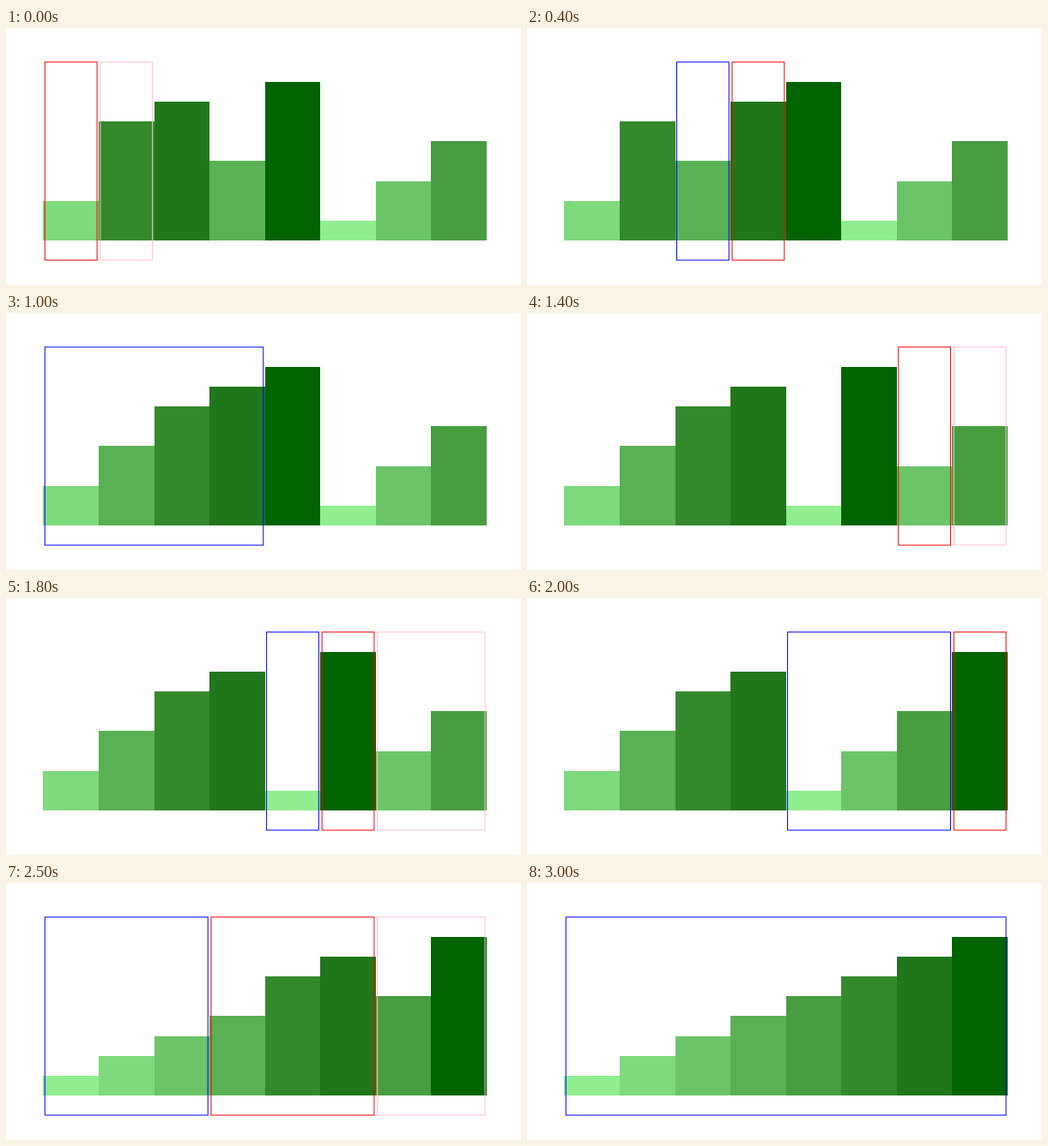
These frames come from a looping animation (600 px wide and 300 px high, 4.1 s). An HTML page with a canvas:

```html
<!DOCTYPE html>
<html lang="en">
<head>
<meta charset="utf-8">
<title>Merge sort</title>
<style>
  html, body { margin: 0; overflow: hidden; background: #fff; }
  canvas { display: block; }
</style>
</head>
<body>
<canvas id="stage" width="600" height="300"></canvas>
<script>
const ctx = document.getElementById("stage").getContext("2d");
const STEP = 100, LOOP = 4100;
const LEFT = 43.4, SLOT = 64.57, BASE = 247.9, UNIT = 23.12, INSET = 1.9;
const greens = ["#90ee90", "#7fd97d", "#6cc469", "#5ab055",
                "#489d41", "#34892c", "#20761a", "#006400"];

const values = [2, 6, 7, 4, 8, 1, 3, 5];
const steps = [];

// Each step holds the bars and the bounds of the merged, left and right runs.
function record(lo, i, mid, hi) {
  steps.push({ bars: values.slice(), bounds: [lo, i, mid, hi] });
}

function sort(lo, hi) {
  if (hi - lo < 2) return;
  let mid = (lo + hi) / 2;
  sort(lo, mid);
  sort(mid, hi);
  record(lo, lo, mid, hi);
  for (let i = lo; i < hi;) {
    if (i === mid || (mid < hi && values[mid] < values[i])) {
      values.splice(i, 0, values.splice(mid, 1)[0]);
      mid++;
    }
    record(lo, ++i, mid, hi);
  }
}

const slotX = k => LEFT + k * SLOT;
const levelY = v => BASE - v * UNIT;

function drawBar(value, k) {
  const x = Math.round(slotX(k)), y = Math.round(levelY(value));
  ctx.fillStyle = greens[value - 1];
  ctx.fillRect(x, y, Math.round(slotX(k + 1)) - x, Math.round(BASE) - y);
}

function drawBox(from, to, color) {
  if (from === to) return;
  ctx.strokeStyle = color;
  ctx.strokeRect(slotX(from) + INSET, levelY(9),
                 (to - from) * SLOT - 2 * INSET, 10 * UNIT);
}

function draw(now) {
  const index = Math.floor(now % LOOP / STEP);
  const { bars, bounds } = steps[Math.min(index, steps.length - 1)];
  ctx.fillStyle = "#fff";
  ctx.fillRect(0, 0, 600, 300);
  bars.forEach(drawBar);
  ["blue", "red", "pink"].forEach((color, n) => drawBox(bounds[n], bounds[n + 1], color));
}

function tick() {
  draw(performance.now() - start);
  requestAnimationFrame(tick);
}

sort(0, values.length);
const start = performance.now();
tick();
</script>
</body>
</html>
```
